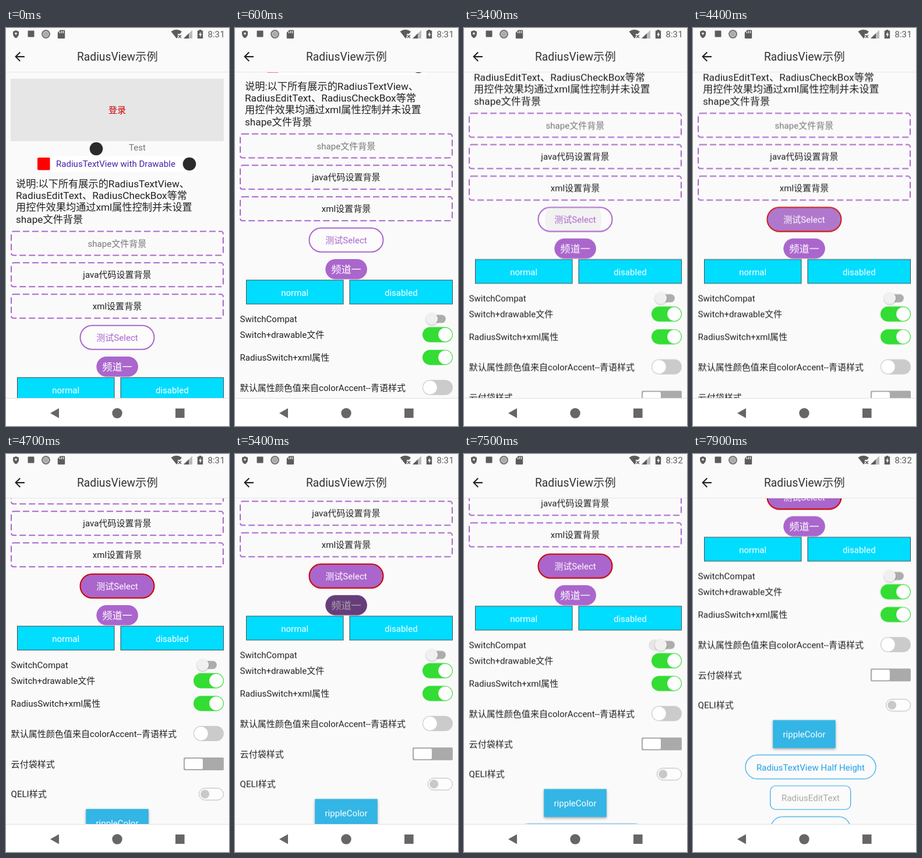
These frames come from a looping animation (383 by 682 pixels, 8000 ms). An HTML page:

```html
<!DOCTYPE html>
<html lang="zh-CN">
<head>
<meta charset="utf-8">
<title>RadiusView</title>
<style>
html, body { margin: 0; width: 100%; height: 100%; overflow: hidden; background: #fafafa; }
svg { display: block; width: 383px; height: 682px; }
text { font: 15.05px Roboto, "Noto Sans CJK SC", "Noto Sans CJK", sans-serif; fill: #212121; }
.mid { text-anchor: middle; }
.big { font-size: 17.2px; }
.title { font-size: 19.3px; fill: #333; }
.gray { fill: #777; }
.hint { fill: #a8a8a8; }
.white { fill: #fff; }
.blue { fill: #1e9fe8; }
.dash { fill: none; stroke: #aa66cc; stroke-width: 2; stroke-dasharray: 11 5; }
.cyan { fill: #00ddff; stroke: #3d4a4d; }
.outline { fill: #fbfbfb; stroke: #2ba5ea; stroke-width: 1.2; }
.icon { fill: #5c5c5c; }
.nav { fill: #666; }
.raised { filter: drop-shadow(0 2px 2px #0005); }
.thumb { filter: drop-shadow(0 1px 1px #0004); }

#page, #select, #selectText, #spot, #press, #channel, #channelText, #trail, #m1, #m2 {
  animation: 8s step-end infinite;
}
#page { animation-name: scroll; }
@keyframes scroll {
  0% { transform: translateY(0); }
  6.25% { transform: translateY(-100px); }
  7.5% { transform: translateY(-167px); }
  8.75% { transform: translateY(-194px); }
  10% { transform: translateY(-202.4px); }
  57.5% { transform: translateY(-255px); }
  58.75% { transform: translateY(-304px); }
  60% { transform: translateY(-321.2px); }
  93.75% { transform: translateY(-338.3px); }
  95% { transform: translateY(-374px); }
  96.25% { transform: translateY(-411px); }
  97.5% { transform: translateY(-439px); }
  98.75%, 100% { transform: translateY(-456.4px); }
}
#select { animation-name: select; }
@keyframes select {
  0%, 32.5% { fill: #fcfcfc; stroke: #aa66cc; }
  25%, 45%, 100% { fill: #aa66cc; stroke: #cc0000; }
}
#selectText { animation-name: selectText; }
@keyframes selectText {
  0%, 32.5% { fill: #aa66cc; }
  25%, 45%, 100% { fill: #fff; }
}
#spot { animation-name: spot; }
@keyframes spot {
  0%, 45%, 100% { opacity: 0; }
  42.5% { opacity: .2; }
}
#press { animation-name: press; }
@keyframes press {
  0%, 46.25%, 57.5%, 100% { opacity: 0; }
  45%, 53.75% { opacity: .1; }
  55% { opacity: .18; }
}
#channel { animation-name: channel; }
@keyframes channel {
  0%, 72.5%, 82.5%, 100% { fill: #aa66cc; }
  67.5%, 77.5% { fill: #663d7a; }
}
#channelText { animation-name: channelText; }
@keyframes channelText {
  0%, 72.5%, 82.5%, 100% { fill: #fff; }
  67.5%, 77.5% { fill: #a9a2ad; }
}
#trail { animation-name: trail; }
@keyframes trail {
  0%, 95%, 100% { opacity: 0; }
  93.75% { opacity: 1; }
}
#m1 { animation-name: before; }
#m2 { animation-name: after; }
@keyframes before { 0% { opacity: 1; } 85%, 100% { opacity: 0; } }
@keyframes after { 0% { opacity: 0; } 85%, 100% { opacity: 1; } }
</style>
</head>
<body>
<svg viewBox="0 0 383 682">
  <defs>
    <clipPath id="view"><rect y="75" width="383" height="559"/></clipPath>
    <clipPath id="pill"><rect x="127" y="509" width="128" height="42" rx="21"/></clipPath>
    <rect id="box" x="9" width="364" height="41" rx="4"/>
    <g id="on">
      <rect x="322" y="-13" width="52" height="26" rx="13" fill="#33dd33"/>
      <circle cx="361" r="11.8" fill="#fff"/>
    </g>
  </defs>
  <rect width="383" height="682" fill="#fafafa"/>

  <g clip-path="url(#view)">
    <g id="page">
      <rect x="8" y="87" width="366" height="107" fill="#e6e6e6"/>
      <text class="mid" x="191" y="145.8" style="fill:#cc0000">登录</text>
      <circle cx="155" cy="207" r="11.3" fill="#2b2b2b"/>
      <text class="gray" x="211" y="210.3">Test</text>

      <rect x="54" y="219" width="274" height="28" fill="#fff"/>
      <rect x="54" y="222" width="21.5" height="21.5" rx="2" fill="#f00"/>
      <text x="86" y="238.4" style="fill:#4a22a8">RadiusTextView with Drawable</text>
      <circle cx="315" cy="233" r="11.3" fill="#2b2b2b"/>

      <text class="big" x="17" y="272.6">说明:以下所有展示的RadiusTextView、</text>
      <text class="big" x="17" y="292.9">RadiusEditText、RadiusCheckBox等常</text>
      <text class="big" x="17" y="313.3">用控件效果均通过xml属性控制并未设置</text>
      <text class="big" x="17" y="333.6">shape文件背景</text>

      <use href="#box" y="348.5" class="dash"/>
      <use href="#box" y="402.3" class="dash"/>
      <use href="#box" y="456.2" class="dash"/>
      <text class="mid gray" x="191" y="374.6">shape文件背景</text>
      <text class="mid" x="191" y="428.4">java代码设置背景</text>
      <text class="mid" x="191" y="482.3">xml设置背景</text>

      <rect id="select" x="127.5" y="509.8" width="127" height="41" rx="20.5" stroke-width="2"/>
      <g clip-path="url(#pill)">
        <circle id="spot" cx="187.5" cy="530.3" r="48.5" fill="#ccc"/>
        <rect id="press" x="127" y="509" width="128" height="42" fill="#ccc"/>
      </g>
      <text id="selectText" class="mid" x="191" y="535.9">测试Select</text>

      <rect id="channel" x="155.3" y="563" width="71.6" height="34.6" rx="17.3"/>
      <text id="channelText" class="mid big" x="191" y="586.8">频道一</text>

      <rect class="cyan" x="19.5" y="599" width="166.5" height="41"/>
      <rect class="cyan" x="197" y="599" width="176.5" height="41"/>
      <text class="mid white" x="102.7" y="625.6">normal</text>
      <text class="mid white" x="285.3" y="625.6">disabled</text>

      <text x="8.6" y="671.2">SwitchCompat</text>
      <rect x="332" y="658.5" width="30" height="14" rx="7" fill="#adadad"/>
      <circle id="trail" cx="327" cy="665.7" r="10" fill="#e6e6e6"/>
      <circle class="thumb" cx="338" cy="665.5" r="10.3" fill="#f0f0f0"/>

      <text x="8.6" y="698.4">Switch+drawable文件</text>
      <use href="#on" y="692.5"/>
      <text x="8.6" y="737">RadiusSwitch+xml属性</text>
      <use href="#on" y="731.4"/>

      <text x="8.6" y="788.7">默认属性颜色值来自colorAccent--青语样式</text>
      <rect x="322" y="770" width="52" height="26" rx="13" fill="#cbcbcb"/>
      <circle cx="335" cy="783" r="11.8" fill="#fff"/>

      <text x="8.6" y="840.6">云付袋样式</text>
      <rect x="305" y="824" width="69" height="22" rx="2" fill="#aaa"/>
      <rect x="307" y="826" width="31" height="18" rx="2.5" fill="#fff"/>

      <text x="8.6" y="892.2">QELI样式</text>
      <rect x="331.5" y="876.6" width="42" height="20.4" rx="10.2" fill="#fdfdfd" stroke="#b4b4b4"/>
      <circle cx="341.7" cy="886.8" r="7.5" fill="#c9c9c9"/>

      <rect class="raised" x="137.3" y="912.3" width="107.5" height="48" fill="#33b5e5"/>
      <text class="mid white" x="191" y="942.2">rippleColor</text>

      <rect class="outline" x="90" y="972.2" width="224" height="41" rx="20.5"/>
      <text class="mid blue" x="202" y="998.6">RadiusTextView Half Height</text>
      <rect class="outline" x="132.8" y="1025" width="138" height="40.5" rx="9"/>
      <text class="mid hint" x="202" y="1051.2">RadiusEditText</text>
      <rect class="outline" x="133.5" y="1077.8" width="137" height="41" rx="20.5"/>
    </g>
  </g>

  <path d="M0 75.5H383" stroke="#e6e6e6"/>
  <path transform="translate(10.9 36.5) scale(1.05)" fill="#222"
    d="M20 11H7.83l5.59-5.59L12 4l-8 8 8 8 1.41-1.41L7.83 13H20z"/>
  <text class="mid title" x="191.3" y="56.3">RadiusView示例</text>

  <g class="icon">
    <path d="M17 4l5 2v4q0 5-5 7.500q-5-2.500-5-7.500V6z"/>
    <circle cx="17" cy="9.500" r="2" fill="#ddd"/>
    <rect x="37.500" y="4.500" width="11" height="11" rx="1"/>
    <circle cx="68.500" cy="10.500" r="7.500" fill="#777"/>
    <circle cx="68.500" cy="10.500" r="4.700" fill="#aaa" stroke="#ddd"/>
    <path d="M93 3.500h7q1.200 0 1.200 1.200v12q0 1.300-1.200 1.300h-10q-1.200 0-1.200-1.300V8z"/>
    <path d="M92.500 6v3M95.500 5v4M98.500 5v4" stroke="#fafafa" stroke-width="1.300"/>
    <path d="M283.500 6q9-6.500 18.500 0l-3 4h-4v5.500l-2 2.500z"/>
    <path d="M296 12l5 5M301 12l-5 5" stroke="#5c5c5c" stroke-width="1.500"/>
    <path d="M305 18L320 3.500V18z" fill="#bbb"/>
    <path d="M305 18L314 9.300V18z"/>
    <path d="M331.500 3h4v1.500h2.700V18h-9.400V4.500h2.700z"/>
    <path d="M334.500 6.500l-3.300 5.300h2v4l3.300-5.500h-2z" fill="#fafafa"/>
    <text x="346.500" y="16" style="fill:#5c5c5c">8:3<tspan id="m1" style="animation:none"></tspan></text>
    <g>
      <text id="m1" x="367.600" y="16" style="fill:#5c5c5c">1</text>
      <text id="m2" x="367.600" y="16" style="fill:#5c5c5c">2</text>
    </g>
  </g>

  <rect y="634" width="383" height="48" fill="#fff"/>
  <path d="M0 634.500H383" stroke="#e0e0e0"/>
  <g class="nav">
    <path d="M76 660L91 651.500V668.500z"/>
    <circle cx="191" cy="660" r="8.700"/>
    <rect x="291" y="652" width="15.600" height="16"/>
  </g>
</svg>
</body>
</html>
```
